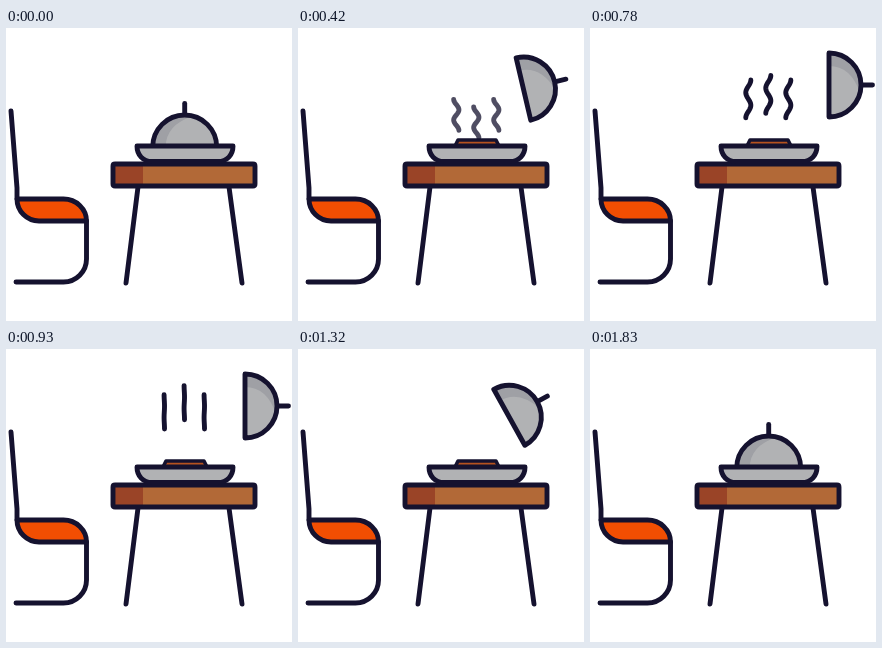
Recreate the animation shown at these times as an HTML page with a canvas. Size 286x293 px, loop 1.86 s.

```html
<!DOCTYPE html>
<html lang="en">
<head>
<meta charset="utf-8">
<title>Dinner is served</title>
<style>
html, body { margin: 0; width: 100%; height: 100%; overflow: hidden; background: #fff; }
canvas { display: block; width: 286px; height: 293px; filter: blur(0.6px); }
</style>
</head>
<body>
<canvas id="stage"></canvas>
<script>
const LOOP = 1860, INK = '#15122f', STEEL = '#b1b2b4', SHADE = '#9fa0a5';
const W = 286, H = 293, LINE = 4.9;
const canvas = document.getElementById('stage');
const ctx = canvas.getContext('2d');
const ratio = window.devicePixelRatio || 1;
canvas.width = W * ratio;
canvas.height = H * ratio;

const clamp = v => Math.min(1, Math.max(0, v));
const span = (t, a, b) => clamp((t - a) / (b - a));
const smooth = u => u * u * (3 - 2 * u);

function shape(d, fill, stroke = INK) {
  const path = new Path2D(d);
  if (fill) { ctx.fillStyle = fill; ctx.fill(path); }
  if (stroke) { ctx.strokeStyle = stroke; ctx.stroke(path); }
}

function chair() {
  shape('M11 171H57.5A23 22 0 0 1 80.5 193H33A22 22 0 0 1 11 171Z', '#f24e02');
  shape('M5 83L11 160V171M80.5 193V231A23 23 0 0 1 57.5 254H10');
}

function table() {
  shape('M132 159L120 255M223 159L236 255');
  shape('M107 136H249V158H107Z', '#b26937', null);
  shape('M107 136H137V158H107Z', '#9a4427', null);
  shape('M109 136H247Q249 136 249 138V156Q249 158 247 158H109Q107 158 107 156V138Q107 136 109 136Z');
}

function food() {
  ctx.lineWidth = 3.6;
  shape('M157 118L160 112H198L201 118Z', '#b5521f');
  ctx.lineWidth = LINE;
}

function bowl() {
  shape('M131 118H227C227 127 221 133.5 212 133.5H146C137 133.5 131 127 131 118Z', STEEL);
}

// The lid swings along a shallow curve while it turns a quarter
function lid(p) {
  const q = 1 - p;
  const x = q * q * 178.7 + 2 * q * p * 190 + p * p * 239;
  const y = q * q * 119 + 2 * q * p * 68 + p * p * 57;
  ctx.save();
  ctx.translate(x, y);
  ctx.rotate(p * Math.PI / 2);
  shape('M0 -32V-43.5');
  shape('M-32 0A32 32 0 0 1 32 0Z', STEEL, null);
  shape('M-32 0A32 32 0 0 1 0 -32L8 -31Q-19 -22 -19 0Z', SHADE, null);
  shape('M-32 0A32 32 0 0 1 32 0Z');
  ctx.restore();
}

// Three half waves whose bends flip from side to side
function wisp(x, y, sway) {
  const length = 34.5 - 3.5 * sway;
  ctx.beginPath();
  for (let i = 0; i <= 60; i++) {
    const u = i / 60;
    ctx.lineTo(x - 2.6 * sway * Math.cos(u * 3 * Math.PI), y + (u - 0.5) * length);
  }
  ctx.strokeStyle = INK;
  ctx.stroke();
}

function steam(t) {
  const alpha = span(t, 210, 490) * (1 - span(t, 1050, 1290));
  if (!alpha) return;
  const d = t - 780;
  const sway = -Math.cos((t - 755) / 670 * 2 * Math.PI);
  const side = 71 - 0.051 * d - 1.86e-5 * d * d;
  const mid = 66.5 - 0.0826 * d - 1.35e-5 * d * d;
  ctx.globalAlpha = alpha;
  wisp(158.3, side, sway);
  wisp(178.3, mid, sway);
  wisp(198.3, side, sway);
  ctx.globalAlpha = 1;
}

function draw(t) {
  ctx.setTransform(ratio, 0, 0, ratio, 0, 0);
  ctx.fillStyle = '#fff';
  ctx.fillRect(0, 0, W, H);
  ctx.lineWidth = LINE;
  ctx.lineCap = ctx.lineJoin = 'round';
  chair();
  table();
  steam(t);
  food();
  lid(smooth(span(t, 15, 550)) - smooth(span(t, 1080, 1715)));
  bowl();
}

const start = performance.now();
function tick() {
  draw((performance.now() - start) % LOOP);
  requestAnimationFrame(tick);
}
tick();
</script>
</body>
</html>
```
